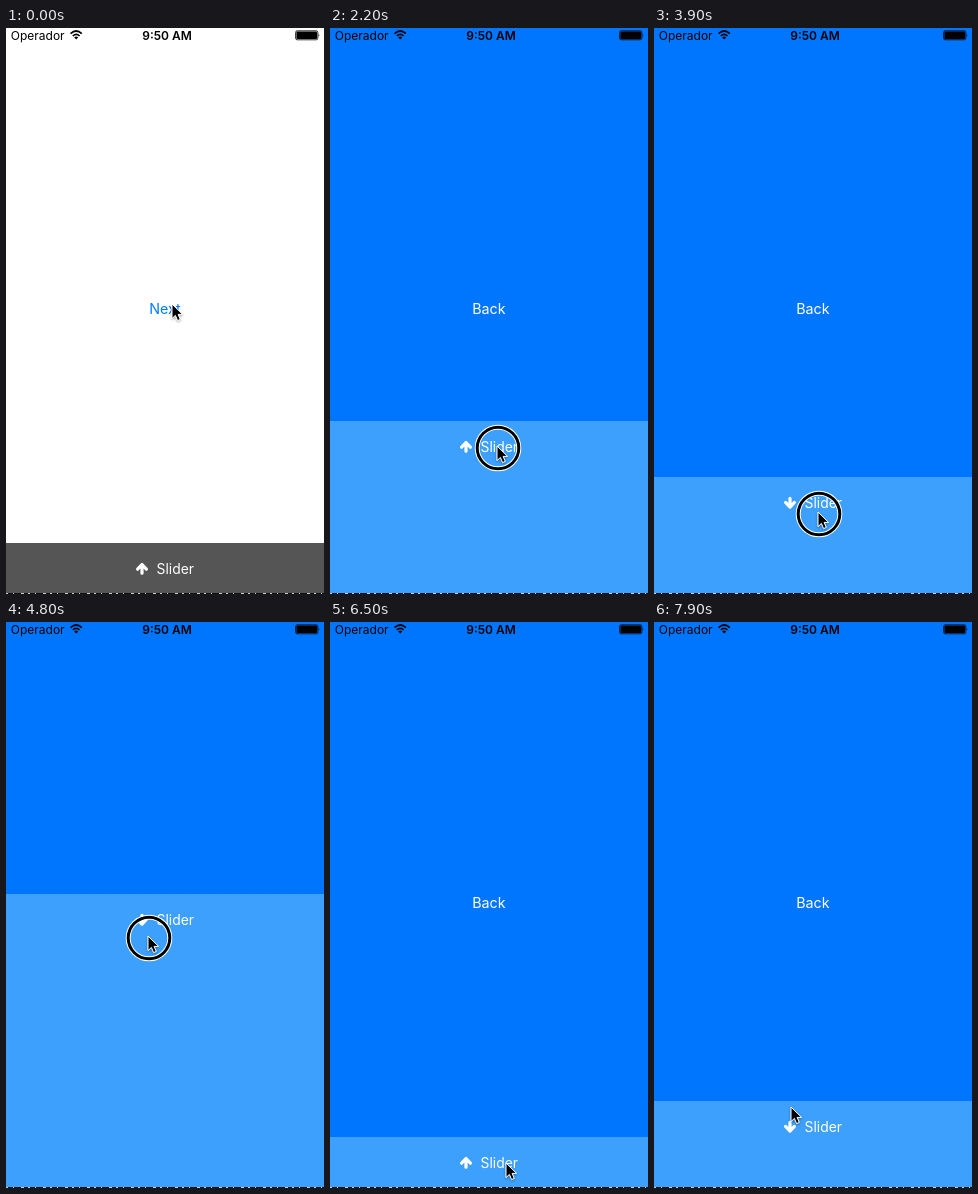
An HTML page that plays this animation: 318x566 px, repeating every 8 s.

```html
<!DOCTYPE html>
<html lang="es">
<head>
<meta charset="utf-8">
<title>Slider</title>
<style>
  html, body { margin: 0; width: 100%; height: 100%; overflow: hidden; background: #fff; }
  svg { display: block; width: 318px; height: 566px; }
  text { font-family: Inter, Roboto, "Liberation Sans", sans-serif; font-size: 14.3px; }
  .mid { text-anchor: middle; }
  .status { font-size: 12px; }
  .time { font-weight: 600; }
  .slider { font-size: 13.9px; fill: #fff; }
  .line { fill: none; stroke: #fff; stroke-width: 3.2; stroke-linecap: round; stroke-linejoin: round; }
</style>
</head>
<body>
<svg viewBox="0 0 318 566">
  <defs>
    <g id="label">
      <path id="arrow" class="line" d="M131.6 26.2 136 21.5 140.4 26.2M136 22V30.2"/>
      <text class="slider" x="150.6" y="30.6">Slider</text>
    </g>
    <filter id="shade" x="-50%" y="-50%" width="200%" height="200%">
      <feDropShadow dx="0" dy="1" stdDeviation="1" flood-opacity=".4"/>
    </filter>
  </defs>

  <rect width="318" height="566" fill="#fff"/>
  <text class="mid" x="159" y="286" fill="#007aff">Next</text>
  <g transform="translate(0 515)">
    <rect width="318" height="51" fill="#555"/>
    <use href="#label"/>
  </g>

  <g id="modal">
    <rect y="-3" width="318" height="569" fill="#0076ff"/>
    <text class="mid" x="158.9" y="286" fill="#fff">Back</text>
    <g id="panel">
      <rect width="318" height="566" fill="#3ca0fc"/>
      <use href="#label"/>
    </g>
  </g>

  <g>
    <path d="M0 565.5H318" stroke="#111"/>
    <path d="M0 565.5H318" stroke="#ccc" stroke-dasharray="2 5 1 7 3 4"/>
  </g>

  <g>
    <text class="status" x="4.8" y="11.5">Operador</text>
    <g fill="none" stroke="#000" stroke-width="1.7">
      <path d="M64.6 5.6Q70.2 .4 75.8 5.6"/>
      <path d="M66.8 8Q70.2 4.8 73.6 8"/>
    </g>
    <path d="M68.2 9.4Q70.2 7.8 72.2 9.4L70.2 11.6Z"/>
    <text class="status time mid" x="161" y="11.5">9:50 AM</text>
    <rect x="289.6" y="2.8" width="22.2" height="9" rx="1.6" fill="none" stroke="#000" stroke-width=".8"/>
    <rect x="290.4" y="3.6" width="20.6" height="7.4" rx=".8"/>
    <path d="M312.6 5.6Q314.2 7.3 312.6 9Z"/>
  </g>

  <g id="cursor">
    <g id="ring" fill="none">
      <circle cx="1" cy="2" r="20.8" stroke="#fff" stroke-width="5"/>
      <circle cx="1" cy="2" r="20.8" stroke="#000" stroke-width="3"/>
    </g>
    <path filter="url(#shade)" d="M0 0V14.6L3.4 11.4 5.6 16.6 8.3 15.4 6.1 10.4H10.6Z" stroke="#fff"/>
  </g>
</svg>

<script>
  const LOOP = 8000, STEP = 100;
  const OPEN = 271, CLOSED = 515, SNAP = 550;
  const $ = id => document.getElementById(id);

  // each press of the pointer: when, and from where to where
  const drag = (down, up, from, to) => ({ down, up, from, to });
  const drags = [
    drag(500, 600, [166, 276], [160, 276]),
    drag(1800, 2600, [167, 540], [166, 296]),
    drag(3070, 4000, [166, 306], [164, 485]),
    drag(4000, 4450, [164, 485], [142, 310]),
    drag(4760, 5450, [142, 314], [161, 516]),
    drag(6640, 7050, [176, 541], [181, 284]),
    drag(7350, 7900, [178, 277], [137, 485])
  ];

  const clamp = (v, lo, hi) => Math.min(hi, Math.max(lo, v));
  const mix = (a, b, u) => a + (b - a) * u;
  const easeInOut = u => u < 0.5 ? 4 * u ** 3 : 1 - 4 * (1 - u) ** 3;
  const easeOut = u => 1 - (1 - u) ** 2;

  function glide(t, t0, t1, a, b) {
    const u = easeInOut(clamp((t - t0) / (t1 - t0), 0, 1));
    return a.map((v, i) => mix(v, b[i], u));
  }

  // the panel follows a press, then settles at the nearer end
  function stateAt(t) {
    let tip = drags[0].from, top = CLOSED, open = false, pressed = false;
    drags.forEach((d, i) => {
      if (t < d.down) return;
      const next = drags[i + 1] || { down: LOOP, from: d.to };
      tip = glide(t, d.down, d.up, d.from, d.to);
      top = clamp(top + tip[1] - d.from[1], OPEN, CLOSED);
      pressed = t < d.up;
      const idle = Math.min(t, next.down) - d.up;
      if (idle <= 0) return;
      tip = glide(t, d.up, next.down, d.to, next.from);
      open = top < (OPEN + CLOSED) / 2;
      top = mix(top, open ? OPEN : CLOSED, easeOut(Math.min(1, idle / SNAP)));
    });
    return { tip, top, open, pressed };
  }

  // critically damped rise of the second screen
  function modalTop(t) {
    const x = 0.0174 * Math.max(0, t - drags[0].up);
    return 566 * (1 + x) * Math.exp(-x);
  }

  function move(id, x, y) {
    $(id).setAttribute("transform", `translate(${Math.round(x)} ${Math.round(y)})`);
  }
  function show(id, on) {
    $(id).style.display = on ? "" : "none";
  }

  function draw(t) {
    const { tip, top, open, pressed } = stateAt(t);
    show("modal", t > drags[0].up);
    show("ring", pressed);
    move("modal", 0, modalTop(t));
    move("panel", 0, top);
    move("cursor", ...tip);
    $("arrow").setAttribute("transform", open ? "rotate(180 136 25.8)" : "");
  }

  // the picture advances ten times a second
  const start = performance.now();
  function tick() {
    const t = (performance.now() - start + 4) % LOOP;
    draw(Math.floor(t / STEP) * STEP);
    requestAnimationFrame(tick);
  }
  tick();
</script>
</body>
</html>
```
